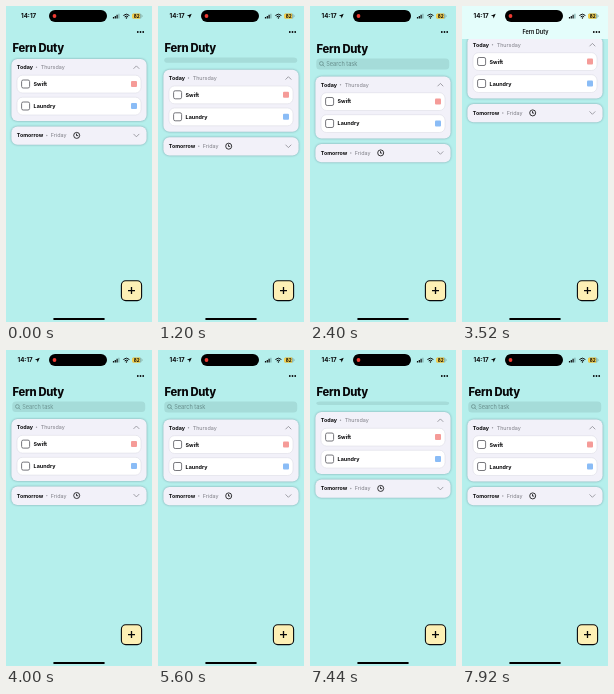
Recreate the animation shown at these times as an HTML page. Size 146 by 316 pixels, loop 8000 ms.

```html
<!DOCTYPE html>
<html lang="en">
<head>
<meta charset="utf-8">
<style>
html, body { margin: 0; width: 100%; height: 100%; overflow: hidden; background: #b5efec; }
svg { display: block; width: 100vw; height: 100vh; }
text { font-family: Inter, "Open Sans", sans-serif; font-size: 5.4px; fill: #08080a; }
.b { font-weight: 700; }
.dim { fill: #7f7f87; }
.card { fill: #f2f1f9; filter: drop-shadow(0 .4px 1.1px rgba(40, 60, 80, .42)); }
.row { fill: #fff; stroke: #d6d6e0; stroke-width: .5; }
.box { fill: #fff; stroke: #77777c; stroke-width: 1; }
.chev { fill: none; stroke: #8b8b92; stroke-width: .8; stroke-linecap: round; stroke-linejoin: round; }
.ink { fill: none; stroke: #08080a; stroke-width: 1; }
</style>
</head>
<body>
<svg viewBox="0 0 146 316">
  <defs>
    <clipPath id="below"><rect y="33" width="146" height="283"/></clipPath>
  </defs>

  <g clip-path="url(#below)">
    <g id="head">
      <text id="title" x="0" y="0" style="font-size:11.2px;font-weight:800;letter-spacing:-.3px">Fern Duty</text>
      <rect id="field" x="6.3" y="51.5" width="132.9" rx="3.5" fill="#a5dcd9"/>
      <g id="hint">
        <circle cx="11.4" cy="56.5" r="1.9" fill="none" stroke="#5f8785" stroke-width=".7"/>
        <path d="M12.8 57.9L14.4 59.5" stroke="#5f8785" stroke-width=".7"/>
        <text x="16.2" y="59" style="fill:#658c8a;font-size:5.6px">Search task</text>
      </g>
    </g>

    <g id="cards">
      <rect class="card" x="5.4" y="52.9" width="135.2" height="62.1" rx="6"/>
      <text class="b" x="10.8" y="63.1">Today</text>
      <circle cx="30.5" cy="61.2" r=".7" fill="#9a9aa2"/>
      <text class="dim" x="34.7" y="63.1">Thursday</text>
      <path class="chev" d="M127.8 62.5L130.4 59.9L133 62.5"/>
      <g id="rows"></g>
      <rect class="card" x="5.4" y="120.4" width="135.2" height="18.4" rx="6"/>
      <text class="b" x="10.8" y="131.4" style="font-size:5.3px">Tomorrow</text>
      <circle cx="40.8" cy="129.5" r=".7" fill="#9a9aa2"/>
      <text class="dim" x="44.8" y="131.4">Friday</text>
      <circle class="ink" cx="70.7" cy="129.4" r="3" style="stroke-width:.8"/>
      <path class="ink" d="M70.5 127.6V129.6H72.2" style="stroke-width:.8"/>
      <path class="chev" d="M127.8 128.2L130.4 130.8L133 128.2"/>
    </g>
  </g>

  <g id="bar">
    <rect width="146" height="33" fill="#e4fdfb"/>
    <text x="73.5" y="28" text-anchor="middle" style="font-size:5.5px;font-weight:600">Fern Duty</text>
  </g>

  <text id="clock" class="b" y="12.3" style="font-size:6.2px">14:17</text>
  <path id="arrow" d="M33.7 7.7L31.6 12.5L31.1 10.3L28.9 9.8Z"/>
  <rect x="43" y="4" width="58" height="12" rx="6"/>
  <circle cx="48.5" cy="10" r="1.9" fill="#ee3b32"/>
  <path d="M107.5 12.4v-1.5M109.3 12.4v-2.5M111.1 12.4v-3.6" class="ink" style="stroke-width:1.2"/>
  <path d="M112.9 12.4v-4.7" stroke="#7fb0ae" stroke-width="1.2"/>
  <path d="M117.4 9.5Q120.4 6.8 123.4 9.5M118.7 10.9Q120.4 9.4 122.1 10.9" class="ink"/>
  <circle cx="120.4" cy="12" r=".7"/>
  <rect x="126" y="7.4" width="9.6" height="5.4" rx="1.7" fill="#8fb7ae"/>
  <path d="M127.7 7.4H134V12.8H127.7A1.7 1.7 0 0 1 126 11.1V9.1A1.7 1.7 0 0 1 127.7 7.4Z" fill="#f3cf4c"/>
  <path d="M136.4 9.3v1.6" stroke="#8fb7ae" stroke-width=".7"/>
  <text class="b" x="130.7" y="11.8" text-anchor="middle" style="font-size:4.6px">82</text>
  <path d="M131.8 26h0M134.5 26h0M137.2 26h0" stroke="#08080a" stroke-width="1.8" stroke-linecap="round"/>

  <rect x="115.4" y="274.8" width="20.2" height="19.8" rx="4.4" fill="#fdf0b5" stroke="#08080a" stroke-width="1.1"/>
  <path class="ink" d="M122 284.6H129M125.5 281.1V288.1" style="stroke-width:1.3"/>
  <rect x="47.2" y="312.1" width="51.6" height="1.8" rx=".9"/>
</svg>
<script>
const LOOP = 8000, FOLD = 16.5;
const $ = id => document.getElementById(id);
const clamp = (v, lo, hi) => Math.min(hi, Math.max(lo, v));
const move = (el, x, y, k = 1) => el.setAttribute("transform", `translate(${x} ${y}) scale(${k})`);

$("rows").innerHTML = [["Swift", 69.2, "#f59b98"], ["Laundry", 91.2, "#8abcf6"]].map(([name, y, color]) => `
  <rect class="row" x="11" y="${y}" width="124" height="17.8" rx="5.5"/>
  <rect class="box" x="15.6" y="${y + 4.8}" width="8" height="8" rx="1.6"/>
  <text class="b" x="27.6" y="${y + 10.8}">${name}</text>
  <rect x="125" y="${y + 5.8}" width="6" height="6" rx="1" fill="${color}"/>`).join("");

// Scroll offset: 0 shows the search field, FOLD hides it, below 0 is overscroll.
const ease = (t, a, b) => { const p = clamp((t - a) / (b - a), 0, 1); return p * p * (3 - 2 * p); };
const settle = (t, start, tau) => Math.exp(-(t - start) / tau);

function scrollAt(t) {
  if (t < 1840) return FOLD - 36.5 * ease(t, 920, 1700);
  if (t < 2720) return -20 * settle(t, 1840, 187);
  if (t < 3560) return 39 * ease(t, 2720, 3480);
  if (t < 6300) return 39 * settle(t, 3560, 95);
  return 15 * (ease(t, 6300, 6880) - ease(t, 7120, 7760));
}

function draw(now) {
  const t = now % LOOP, s = scrollAt(t);
  const over = Math.max(0, -s), fold = clamp(s, 0, FOLD);
  const showBar = clamp((s - 26) / 6, 0, 1);
  move($("head"), 0, over - Math.max(0, s - FOLD));
  move($("title"), 6.6, 46.2, 1 + over * .0015);
  $("field").setAttribute("height", Math.max(0, 11 - fold));
  $("hint").setAttribute("opacity", clamp(1 - fold / 4, 0, 1));
  move($("cards"), 0, FOLD - s);
  $("bar").setAttribute("opacity", showBar);

  const located = t >= 480;
  $("clock").setAttribute("x", located ? 11.5 : 15);
  $("arrow").setAttribute("opacity", located ? 1 : 0);
  requestAnimationFrame(draw);
}
requestAnimationFrame(draw);
</script>
</body>
</html>
```
